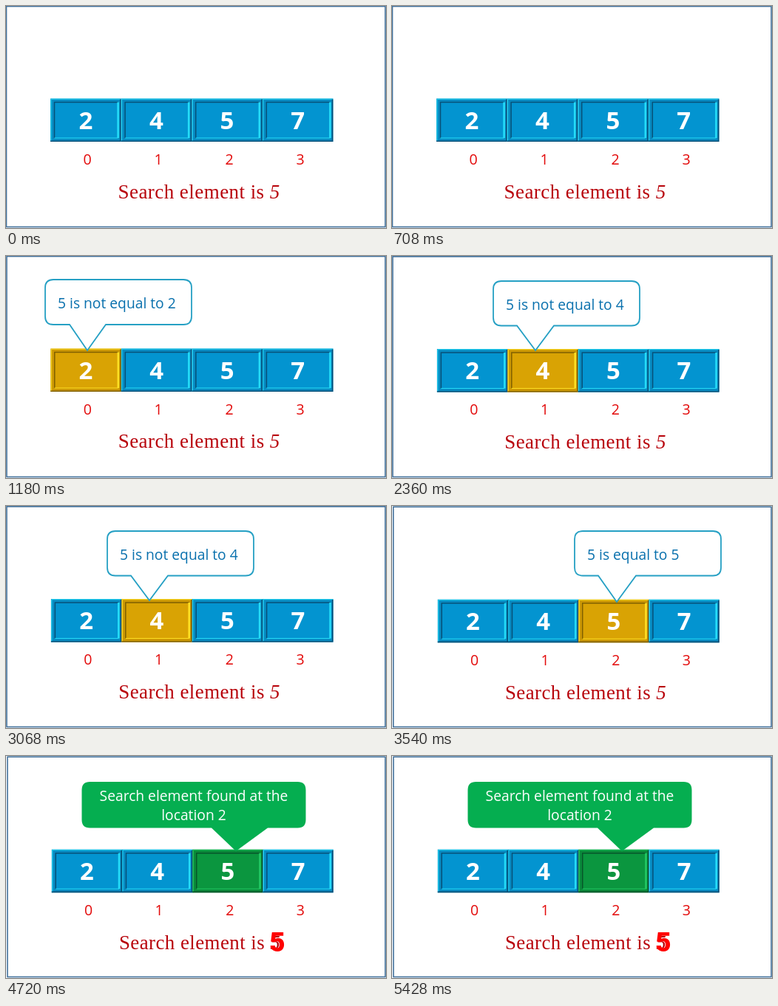
These frames come from a looping animation (514 px wide and 301 px high, 5900 ms). An HTML page:

```html
<!DOCTYPE html>
<html lang="en">
<head>
<meta charset="utf-8">
<title>Linear search</title>
<style>
  html, body { margin: 0; width: 100%; height: 100%; overflow: hidden; background: #fff; }
  svg { display: block; width: 100%; height: 100%; }
  text { font-family: "Open Sans", "Noto Sans", sans-serif; }
  .value { font-size: 33px; font-weight: 700; fill: #fff; text-anchor: middle; }
  .index { font-size: 19.6px; fill: #e30b0b; text-anchor: middle; }
  .note { font-size: 19.25px; }
  .caption { font: 27px "Liberation Serif", "Noto Serif", serif; letter-spacing: .45px; fill: #b8040c; }
  .hit { font: 900 37px Roboto, "Liberation Sans", sans-serif; fill: #f00; text-anchor: middle; }
</style>
</head>
<body>
<svg id="stage" viewBox="0 0 514 301" preserveAspectRatio="none"></svg>
<script>
const STEP = 1180;
const VALUES = [2, 4, 5, 7];
const CELL = { x: 60, y: 125.5, w: 95.6, h: 58.5 };
const BLUE = { face: '#0394d0', rim: '#078bc2', light: '#25dcf8', dark: '#075078' };
const GOLD = { face: '#d9a304', rim: '#cc9804', light: '#ffdf24', dark: '#806000' };
const GREEN = { face: '#0b963f', rim: '#0a8a3a', light: '#22c964', dark: '#07552a' };

// dx, dy: slight drift of the slide toward its lower right corner
const SCENES = [
  { dx: 0, dy: 0, edge: [0.5, 0.5] },
  { dx: 0.3, dy: 0, edge: [1, 0.5], active: 0, theme: GOLD,
    bubble: { x: 53, y: 32, w: 198, h: 61, tail: [86, 110, 135], tip: 128 }, note: '5 is not equal to 2' },
  { dx: 1, dy: 0.5, edge: [1, 0.8], active: 1, theme: GOLD,
    bubble: { x: 137, y: 34, w: 198, h: 60.5, tail: [169, 194, 219], tip: 128 }, note: '5 is not equal to 4' },
  { dx: 2, dy: 1.2, edge: [1.8, 1.2], active: 2, theme: GOLD,
    bubble: { x: 247, y: 34, w: 198, h: 60.5, tail: [279, 304, 330], tip: 130 }, note: '5 is equal to 5' },
  { dx: 2, dy: 1.2, edge: [2, 1.2], active: 2, theme: GREEN, found: true,
    bubble: { x: 102.5, y: 35, w: 303, h: 62.5, tail: [278, 311, 354], tip: 129 } }
];

const label = (cls, x, y, content, extra = '') =>
  `<text class="${cls}" x="${x}" y="${y}" ${extra}>${content}</text>`;

const line = (d, color, width) =>
  `<path d="${d}" fill="none" stroke="${color}" stroke-width="${width}"/>`;

function cell(i, theme) {
  const { w, h, y } = CELL;
  const x = CELL.x + i * w;
  const l = x + 5.5, r = x + w - 4, t = y + 5, b = y + h - 5;
  return `<rect x="${x}" y="${y}" width="${w}" height="${h}" fill="${theme.rim}"/>` +
    `<rect x="${l}" y="${t}" width="${r - l}" height="${b - t}" fill="${theme.face}"/>` +
    line(`M${x + 1} ${y + h}V${y + 0.7}H${x + w}`, theme.light, 1) +
    line(`M${x} ${y + h - 0.8}H${x + w - 0.8}V${y + 1}`, theme.dark, 1.6) +
    line(`M${l} ${b}V${t}H${r}`, theme.dark, 1.5) +
    line(`M${l} ${b}H${r}`, theme.light, 1) +
    line(`M${r} ${t}V${b}`, theme.light, 2.6) +
    label('value', x + w / 2, 167, VALUES[i]) +
    label('index', 110 + i * 96, 215, i);
}

function bubble({ x, y, w, h, tail, tip }, solid) {
  const r = 11, right = x + w, bottom = y + h;
  const d = `M${x + r} ${y}H${right - r}Q${right} ${y} ${right} ${y + r}V${bottom - r}` +
    `Q${right} ${bottom} ${right - r} ${bottom}H${tail[2]}L${tail[1]} ${tip}L${tail[0]} ${bottom}` +
    `H${x + r}Q${x} ${bottom} ${x} ${bottom - r}V${y + r}Q${x} ${y} ${x + r} ${y}Z`;
  return solid
    ? `<path d="${d}" fill="#05ae50"/>`
    : `<path d="${d}" fill="#fff" stroke="#26a0c4" stroke-width="1.8"/>`;
}

function drawScene(s) {
  const [left, top] = s.edge;
  let out = '<rect width="514" height="301" fill="#fff"/>' +
    `<rect x="${left}" y="${top}" width="${513 - left}" height="${299.5 - top}" ` +
    'fill="none" stroke="#41719c" stroke-width="1.6"/>';
  const cells = VALUES.map((_, i) => cell(i, i === s.active ? s.theme : BLUE)).join('');
  const caption = label('caption', 151.5, 260.5, 'Search element is <tspan font-style="italic">5</tspan>');
  out += `<g transform="translate(${s.dx} ${s.dy}) scale(${1 - s.dx / 514} 1)">${cells}${caption}</g>`;
  if (s.bubble) out += bubble(s.bubble, s.found);
  if (s.note) out += label('note', s.bubble.x + 17, s.bubble.y + 39, s.note, 'fill="#0870ad"');
  if (s.found) {
    const centered = 'fill="#fff" text-anchor="middle"';
    out += label('note', 254, 61, 'Search element found at the', centered) +
      label('note', 254, 87, 'location 2', centered) +
      label('hit', 367, 265, 5);
  }
  return out;
}

const stage = document.getElementById('stage');
const start = performance.now();
let shown = -1;

function render(now) {
  const current = Math.floor(Math.max(0, now - start) / STEP) % SCENES.length;
  if (current !== shown) {
    stage.innerHTML = drawScene(SCENES[current]);
    shown = current;
  }
  requestAnimationFrame(render);
}
render(start);
</script>
</body>
</html>
```
